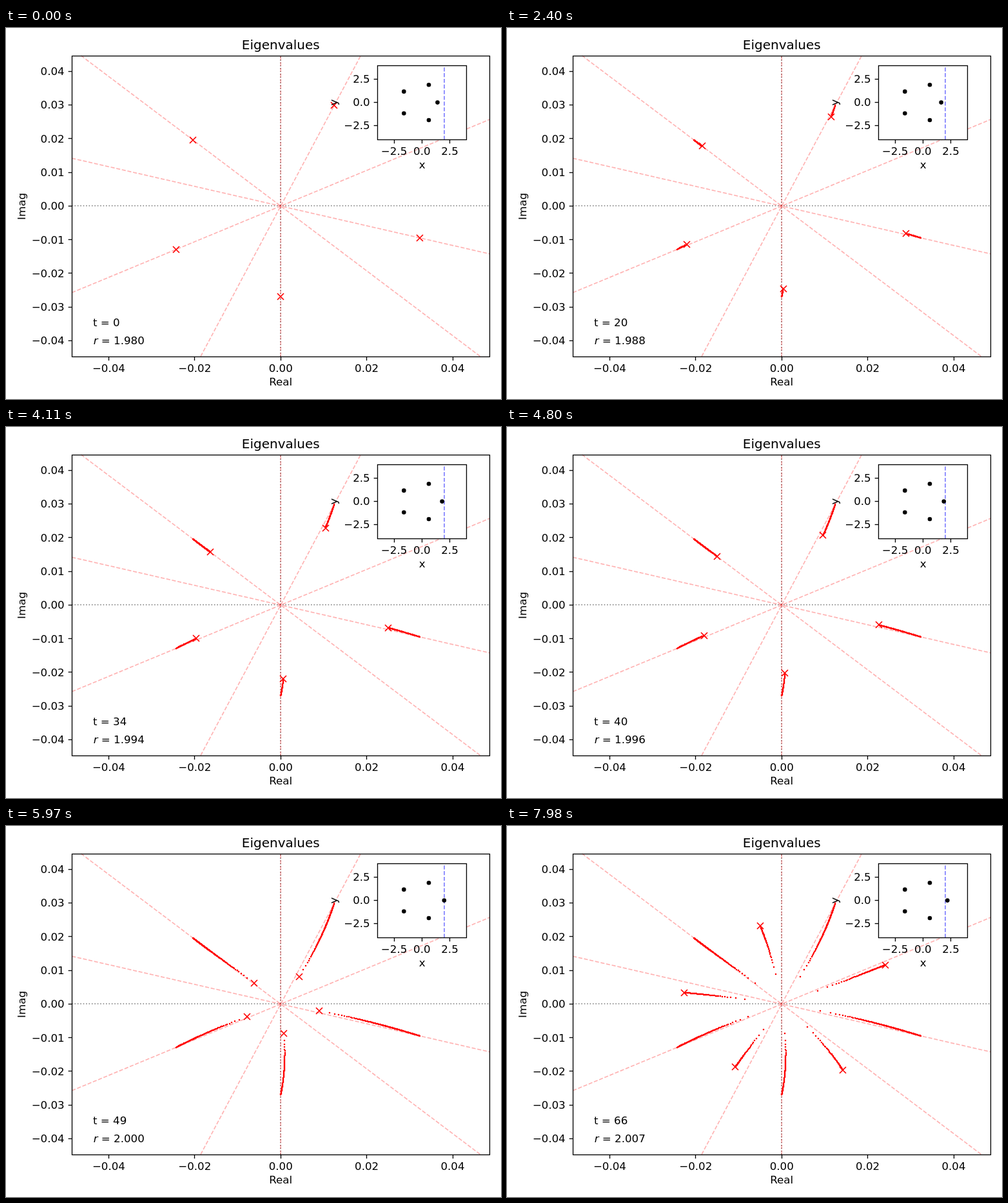
Animation, 768 px wide and 576 px high, one loop 8000 ms. Source, as an HTML page:

```html
<!DOCTYPE html>
<html lang="en">
<head>
<meta charset="utf-8">
<title>Eigenvalues</title>
<style>
  html, body { margin: 0; width: 100%; height: 100%; overflow: hidden; background: #fff; }
  svg { display: block; }
  text { font: 16.667px "DejaVu Sans", sans-serif; fill: #000; }
  .title { font-size: 20px; }
  .end { text-anchor: end; }
  .mid { text-anchor: middle; }
  .frame { fill: none; stroke: #000; stroke-width: 1.333; }
  .dashed { fill: none; stroke: #f00; stroke-opacity: .3; stroke-width: 1.667; stroke-dasharray: 6.17 2.67; }
  .blue { stroke: #00f; stroke-opacity: .5; }
  .dotted { fill: none; stroke: #000; stroke-opacity: .5; stroke-width: 1.667; stroke-dasharray: 1.667 2.75; }
  #trail { fill: none; stroke: #f00; stroke-width: 2.6; stroke-linecap: round; }
  #crosses { fill: none; stroke: #f00; stroke-width: 1.667; }
</style>
</head>
<body>
<svg id="stage" width="768" height="576" viewBox="0 0 768 576">
  <path class="dotted" d="M102 276H750M426 510V43"/>
  <g id="rays"></g>
  <path id="trail"/>
  <path id="crosses"/>
  <rect class="frame" x="102.5" y="43.5" width="648" height="467"/>
  <g id="mainTicks"></g>
  <text class="title mid" x="426.3" y="33">Eigenvalues</text>
  <text class="mid" x="426.2" y="555">Real</text>
  <text class="mid" transform="translate(30 277) rotate(-90)">Imag</text>
  <text id="timeLabel" x="135" y="463"></text>
  <text x="135.7" y="491"><tspan font-style="italic">r</tspan> = <tspan id="radiusLabel"></tspan></text>

  <rect x="576.5" y="58.5" width="138" height="115" fill="#fff"/>
  <path class="dashed blue" d="M680 173.5V58.5"/>
  <g id="bodies"></g>
  <rect class="frame" x="576.5" y="58.5" width="138" height="115"/>
  <g id="insetTicks"></g>
  <text class="mid" x="645.6" y="218">x</text>
  <text class="mid" transform="translate(514 115.5) rotate(-90)">y</text>
</svg>
<script>
const STEP = 30, LOOP = 8000, LAST = 266, TOTAL = 399;
const main = { cx: 426.2, cy: 276.45, sx: 6670, sy: 5225, left: 102.5, bottom: 510.5 };
const inset = { cx: 645.3, cy: 115.6, sx: 17.28, sy: 14.4, left: 576.5, bottom: 173.5 };

// Complex coefficients of the series in the fifth root of (r - 2), in thousandths.
const SERIES = [[29.087, -5.628], [2.195, -2.677], [1.209, -1.236], [-.139, .02], [.03, .052]];

const $ = id => document.getElementById(id);
const snap = v => Math.floor(v) + .5;
const radiusAt = n => 1.98 + .04 * n / TOTAL;

function add(parent, tag, attrs, text = '') {
  const node = document.createElementNS('http://www.w3.org/2000/svg', tag);
  for (const key in attrs) node.setAttribute(key, attrs[key]);
  node.textContent = text;
  return parent.appendChild(node);
}

function eigenvalue(n, branch) {
  const delta = radiusAt(n) - 2;
  const size = Math.pow(Math.abs(delta) / .02, .2);
  const angle = (2 * branch + (delta > 0 ? 1 : 0)) * Math.PI / 5;
  let re = 0, im = 0;
  SERIES.forEach(([a, b], i) => {
    const j = i + 1, m = size ** j, c = m * Math.cos(j * angle), s = m * Math.sin(j * angle);
    re += a * c - b * s;
    im += a * s + b * c;
  });
  return [main.cx + re * main.sx / 1000, main.cy - im * main.sy / 1000];
}

const eigenvalues = n => [0, 1, 2, 3, 4].map(k => eigenvalue(n, k));

// Markers sit on whole pixels.
const markers = (n, shape) =>
  eigenvalues(n).map(([x, y]) => `M${Math.round(x)} ${Math.round(y)}${shape}`).join('');

function ticks(group, axes, xs, ys, digits) {
  const label = v => v.toFixed(digits).replace('-', '\u2212');
  for (const v of xs) {
    const x = axes.cx + v * axes.sx;
    add(group, 'path', { class: 'frame', d: `M${snap(x)} ${axes.bottom}v5.83` });
    add(group, 'text', { class: 'mid', x, y: axes.bottom + 23.5 }, label(v));
  }
  for (const v of ys) {
    const y = axes.cy - v * axes.sy;
    add(group, 'path', { class: 'frame', d: `M${axes.left} ${snap(y)}h-5.83` });
    add(group, 'text', { class: 'end', x: axes.left - 11.8, y: Math.round(y + 5.8) }, label(v));
  }
}

function body(x, y) {
  return add($('bodies'), 'circle', { cx: inset.cx + x * inset.sx, cy: inset.cy - y * inset.sy, r: 3.3 });
}

ticks($('mainTicks'), main, [-.04, -.02, 0, .02, .04],
  [-4, -3, -2, -1, 0, 1, 2, 3, 4].map(v => v / 100), 2);
ticks($('insetTicks'), inset, [-2.5, 0, 2.5], [-2.5, 0, 2.5], 1);

// Rays through the starting eigenvalues, cut at the frame.
for (const [x, y] of eigenvalues(0)) {
  let dx = x - main.cx, dy = y - main.cy;
  if (Math.abs(dx) < 1) dx = 0;
  const k = Math.min(324 / Math.abs(dx), 233.5 / Math.abs(dy)) * (dx > 0 ? -1 : 1);
  add($('rays'), 'path', {
    class: 'dashed',
    d: `M${main.cx + dx * k} ${main.cy + dy * k}L${main.cx - dx * k} ${main.cy - dy * k}`
  });
}

for (let k = 1; k < 5; k++) body(2 * Math.cos(k * Math.PI * .4), 2 * Math.sin(k * Math.PI * .4));
const mover = body(2, 0);

const dots = Array.from({ length: LAST + 1 }, (_, n) => markers(n, 'h.01'));

let shown = -1;
function draw(n) {
  const r = radiusAt(n);
  $('trail').setAttribute('d', dots.slice(0, n).join(''));
  $('crosses').setAttribute('d', markers(n, 'm-5 -5l10 10m0 -10l-10 10'));
  // The inset exaggerates the offset from 2 thirty times.
  mover.setAttribute('cx', inset.cx + (2 + 30 * (r - 2)) * inset.sx);
  $('timeLabel').textContent = `t = ${Math.floor(n / 4)}`;
  $('radiusLabel').textContent = r.toFixed(3);
  shown = n;
}

const start = performance.now();
function tick() {
  const time = (performance.now() - start) % LOOP;
  const n = Math.min(LAST, Math.floor(time / STEP));
  if (n !== shown) draw(n);
  requestAnimationFrame(tick);
}
tick();
</script>
</body>
</html>
```
